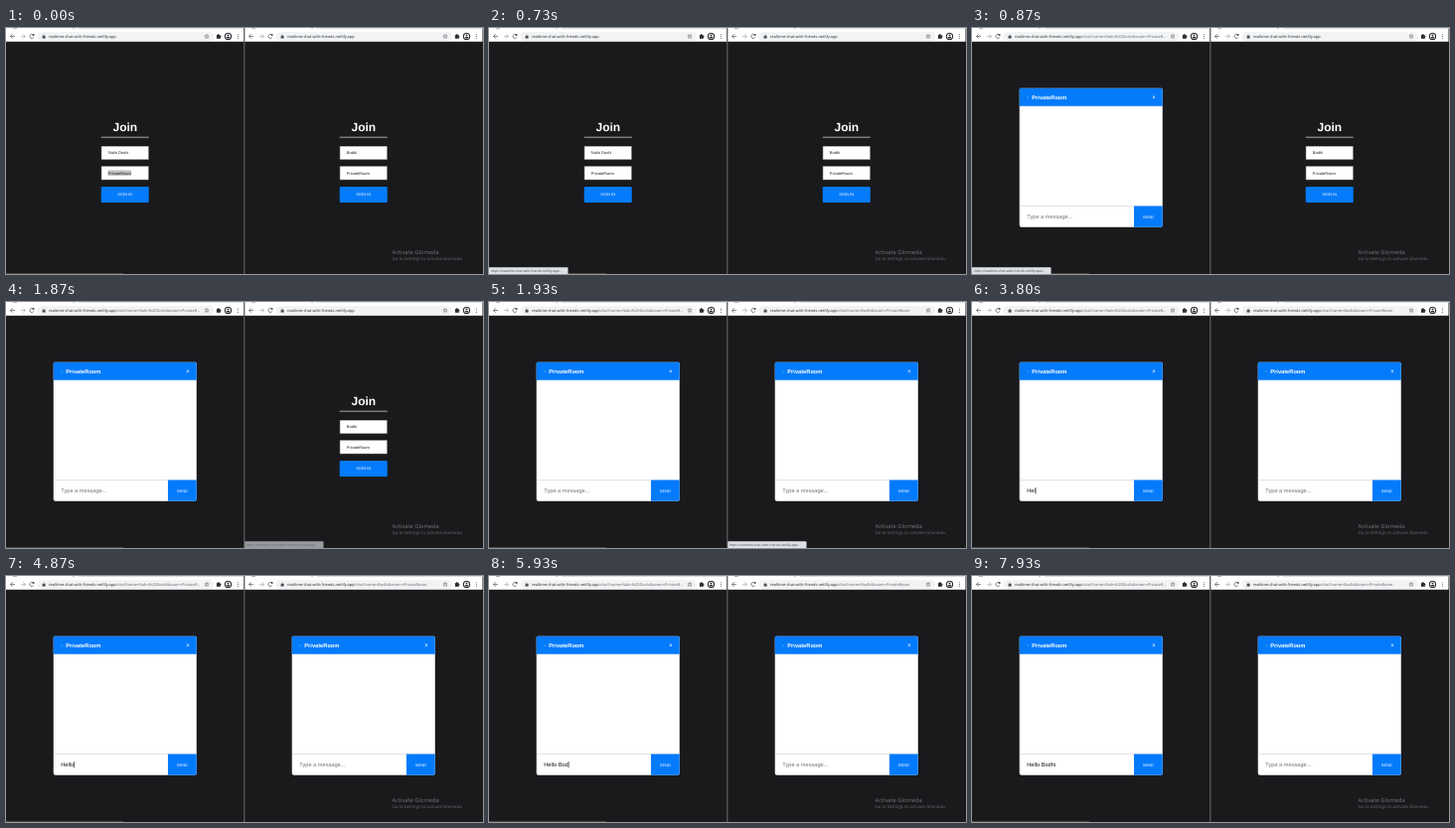
Recreate the animation shown at these times as an HTML page with a canvas. Size 480 px wide and 248 px high, loop 8 s.

```html
<!DOCTYPE html>
<html lang="en">
<head>
<meta charset="utf-8">
<title>Realtime chat</title>
<style>
html, body { margin: 0; width: 100%; height: 100%; overflow: hidden; background: #1a1a1d; }
canvas { display: block; width: 480px; height: 248px; }
</style>
</head>
<body>
<canvas id="stage" width="480" height="248"></canvas>
<script>
const ctx = document.getElementById('stage').getContext('2d');
ctx.textRendering = 'geometricPrecision';

const LOOP = 8000;
const BLUE = '#047bfb';
const ARIAL = '"Liberation Sans", Arial, sans-serif';
const UI = '"Open Sans", sans-serif';
const HOST = 'realtime-chat-with-friends.netlify.app';
const ROOM = 'PrivateRoom';

// Each entry is [time, value]; the value holds until the next entry.
const stepAt = (steps, t) => steps.reduce((value, [start, next]) => t >= start ? next : value, steps[0][1]);

const users = [
  { x: 0, name: 'Nalin Doshi', path: '/chat?name=Nalin%20Doshi&room=PrivateR...', joined: 870,
    bubble: [[0, 0], [70, .6], [130, 1], [1200, .66], [1270, .33], [1330, 0]] },
  { x: 240, name: 'Bodhi', path: '/chat?name=Bodhi&room=' + ROOM, joined: 1930,
    bubble: [[0, 0], [1800, .3], [1870, .65], [1930, 1], [2270, .75], [2330, .5], [2400, .25], [2470, 0]] }
];

const message = 'Hello Bodhi';
const typed = [[0, 0], [3330, 1], [3530, 2], [3800, 3], [4670, 4], [4870, 5], [5000, 6],
  [5600, 7], [5730, 8], [5930, 9], [6130, 10], [6330, 11]];
const caret = [[0, 0], [2670, 1], [3200, 0], [3330, 1], [4330, 0], [4670, 1], [5530, 0],
  [5600, 1], [6870, 0], [7400, 1], [7930, 0]];

function rect(x, y, w, h, color, radius = 0) {
  ctx.fillStyle = color;
  ctx.beginPath();
  ctx.roundRect(x, y, w, h, radius);
  ctx.fill();
}

function text(str, x, y, size, color, family = ARIAL, weight = 400, align = 'left') {
  ctx.font = `${weight} ${size}px ${family}`;
  ctx.textAlign = align;
  ctx.fillStyle = color;
  ctx.fillText(str, x, y);
  return ctx.measureText(str).width;
}

function line(points, color, width = .7) {
  ctx.strokeStyle = color;
  ctx.lineWidth = width;
  ctx.beginPath();
  points.forEach(([x, y]) => ctx.lineTo(x, y));
  ctx.stroke();
}

function ring(x, y, r, color, width = .7, from = 0, to = 2 * Math.PI) {
  ctx.strokeStyle = color;
  ctx.lineWidth = width;
  ctx.beginPath();
  ctx.arc(x, y, r, from, to);
  ctx.stroke();
}

function toolbar(path) {
  const ink = '#4a4d51', dark = '#2b2e32', pale = '#a5a8ac';
  rect(0, 0, 239.5, 13.8, '#fff');
  rect(73, 0, 166.5, 1, '#dee1e6');
  rect(7, 0, 4, .6, '#888');
  rect(67, 0, 2, .6, '#999');
  rect(31.5, 4, 177.5, 9, '#f1f3f4', 4.5);

  line([[9, 8.4], [4.6, 8.4]], ink);
  line([[6.7, 6.2], [4.5, 8.4], [6.7, 10.6]], ink);
  line([[15, 8.4], [19.4, 8.4]], pale);
  line([[17.3, 6.2], [19.5, 8.4], [17.3, 10.6]], pale);
  ring(26, 8.4, 2.1, ink, .7, .5, 5.6);
  rect(26.7, 6, 1.8, 1.8, ink);

  rect(36.6, 8, 3, 2.6, ink, .4);
  ring(38.1, 7.9, 1, ink, .5, Math.PI, 2 * Math.PI);
  const hostWidth = text(HOST, 43, 9.9, 3.93, '#222428', UI);
  text(path, 43 + hostWidth, 9.9, 3.93, '#63676c', UI);

  const star = Array.from({ length: 11 }, (_, i) => {
    const r = i % 2 ? 1 : 2.2, a = i * Math.PI / 5 - Math.PI / 2;
    return [202 + r * Math.cos(a), 8.5 + r * Math.sin(a)];
  });
  line(star, ink, .5);
  rect(211.9, 7, 3.9, 3.8, dark, .4);
  rect(213, 6, 1.6, 2, dark, .8);
  rect(215, 8, 1.6, 1.6, dark, .8);
  ring(223.5, 8.4, 3.1, dark, 1.1);
  rect(222.5, 6.6, 2, 2, dark, 1);
  rect(221.7, 9, 3.6, 1.4, dark, .7);
  [6.2, 8.1, 10].forEach(y => rect(232.8, y, 1, 1, ink, .5));
}

function inputBox(y, h) {
  rect(95.75, y, 48, h, '#767676');
  rect(96.3, y + .55, 46.9, h - 1.1, '#fff');
}

function joinForm(user, t) {
  const left = user.x === 0;
  text('Join', 119.8, 104.2, 12, '#fff', ARIAL, 700, 'center');
  rect(95.75, 109.7, 48, .9, '#d8d8d8');
  inputBox(118.9, 14);
  inputBox(139.1, 14.2);
  const nameWidth = text(user.name, 102.8, 127.2, 4, '#222');
  if (left && t < 670) rect(102.5, 143.3, 23.5, 5.6, '#c4c4c4');
  if (!left && t >= 130 && t < 670) rect(103 + nameWidth, 123.3, .5, 5.4, '#222');
  text(ROOM, 102.8, 147.6, 4, '#222');
  rect(95.75, 159.9, 48, 16, BLUE, 1.2);
  text('SIGN IN', 119.8, 169.3, 4, '#fff', ARIAL, 400, 'center');
}

function chatBox(user, t) {
  rect(47.75, 60.8, 144, 140, '#fff', [1.2, 1.2, 2, 2]);
  rect(47.75, 60.8, 144, 18, BLUE, [1.2, 1.2, 0, 0]);
  rect(55.6, 69.4, 1.1, 1.1, '#9fe0a8', .55);
  text(ROOM, 60.3, 71.7, 5.7, '#fff', ARIAL, 700);
  line([[181.7, 68.5], [184.1, 70.9]], '#fff', .7);
  line([[184.1, 68.5], [181.7, 70.9]], '#fff', .7);

  rect(47.75, 179.2, 144, .6, '#c8c8c8');
  rect(162.95, 179.6, 28.8, 21.2, BLUE, [0, 0, 2, 0]);
  text('SEND', 177.4, 191.6, 4, '#fff', ARIAL, 400, 'center');

  const draft = user.x ? '' : message.slice(0, stepAt(typed, t));
  const width = text(draft, 55.3, 192, 5.65, '#111');
  if (!draft) text('Type a message...', 55.3, 192, 5.65, '#757575');
  if (!user.x && stepAt(caret, t)) rect(55.3 + width, 187, .6, 6.6, '#111');
}

function statusBubble(opacity) {
  ctx.globalAlpha = opacity;
  rect(0, 241.2, 79.5, 6.8, '#dee1e6', [0, 1, 0, 0]);
  text(`https://${HOST}/...`, 2, 245.6, 3.3, '#3c4045', UI);
  ctx.globalAlpha = 1;
}

function drawWindow(user, t) {
  const joined = t >= user.joined;
  ctx.save();
  ctx.translate(user.x, 0);
  toolbar(joined ? user.path : '');
  (joined ? chatBox : joinForm)(user, t);
  statusBubble(stepAt(user.bubble, t));
  ctx.restore();
}

function draw(now) {
  const t = now % LOOP;
  rect(0, 0, 480, 248, '#1a1a1d');
  rect(0, 247, 118, 1, '#47463c');
  users.forEach(user => drawWindow(user, t));
  rect(239.2, 0, 1.2, 248, '#5f5f61');
  text('Activate Glomeda', 388.6, 228, 5.75, '#77777a', UI);
  text('Go to Settings to activate Glomeda.', 388.6, 234.4, 4.35, '#6c6c6f', UI);
}

const start = performance.now();
function tick() {
  draw(performance.now() - start);
  requestAnimationFrame(tick);
}
tick();
</script>
</body>
</html>
```
